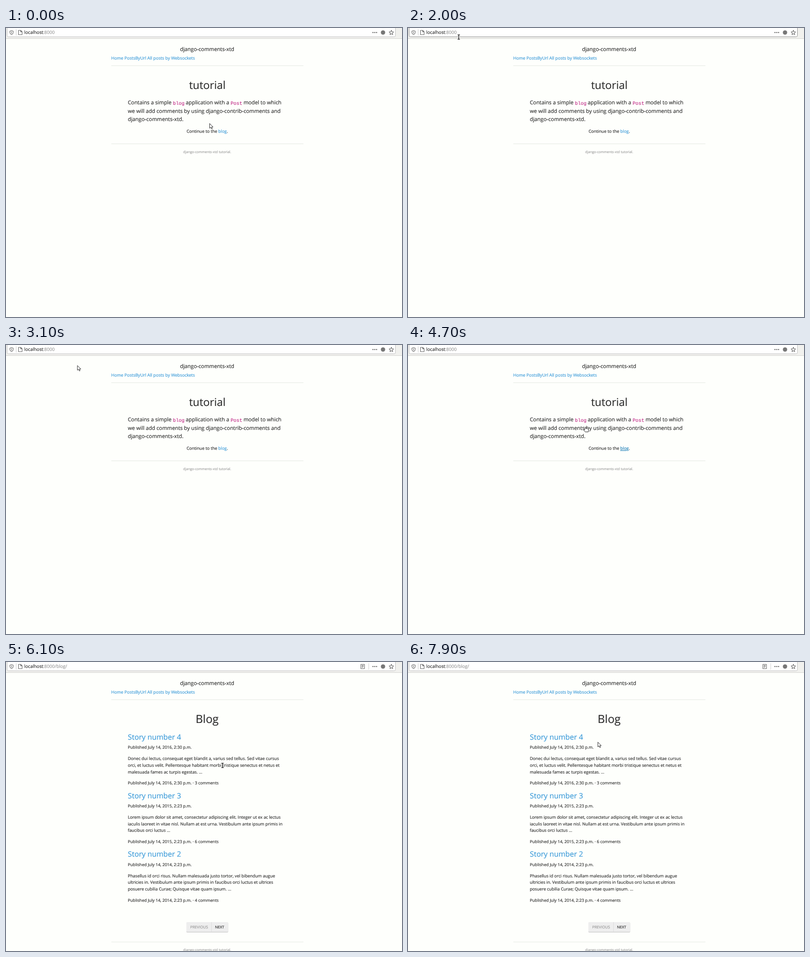
Animation, 876 px wide and 640 px high, one loop 8 s. Source, as an HTML page:

```html
<!DOCTYPE html>
<html lang="en">
<head>
<meta charset="utf-8">
<title>Blog tutorial</title>
<style>
  html, body { margin: 0; width: 876px; height: 640px; overflow: hidden; background: #fefffc; }
  svg { display: block; }
  text { font: 9.35px "Open Sans", "Noto Sans", sans-serif; color: #2d2d2d; text-rendering: geometricPrecision; white-space: pre; }
  text, tspan { fill: currentColor; stroke: currentColor; stroke-width: .18; }
  .mid { text-anchor: middle; }
  .lead { font-size: 11.69px; }
  .code { font: 10.7px "Liberation Mono", monospace; color: #c2308a; }
  .link { color: #3a9ad9; }
  .hover { color: #157ab5; text-decoration: underline; }
  .foot { font-size: 7.47px; color: #a0a0a0; }
  .date { font-size: 9.1px; }
  .story { font-size: 16.25px; }
  .btn { font-size: 8.4px; }
  .rule { stroke: #e3e8e1; }
  .icon { fill: none; stroke: #606060; stroke-width: 1.1; stroke-linejoin: round; }
  .cursor { fill: #fff; stroke: #222; stroke-linejoin: round; }
</style>
</head>
<body>
<svg width="876" height="640" viewBox="0 0 876 640">
  <rect width="876" height="23" fill="#f1f1ee"/>
  <path d="M0 23.5H876" stroke="#d2d2cf"/>
  <rect id="field" x="2.5" y="-4.5" width="859" height="24" rx="3" fill="#fff"/>
  <g class="icon">
    <path d="M12.3 5.7L16 6.9V9.5Q15.8 13 12.3 14.6Q8.8 13 8.6 9.5V6.9ZM12.3 8V12"/>
    <path d="M22.5 3V17" stroke="#d0d0d0"/>
    <path d="M27.6 5.2H32.6L35.6 8.2V14.8H27.6ZM32.4 5.4V8.4H35.4"/>
    <path d="M852.5 5L854 8.3L857.5 8.7L854.9 11.1L855.6 14.6L852.5 12.8L849.4 14.6L850.1 11.1L847.5 8.7L851 8.3Z"/>
  </g>
  <g fill="#606060">
    <circle cx="811.8" cy="10" r="1.3"/><circle cx="815.8" cy="10" r="1.3"/><circle cx="819.8" cy="10" r="1.3"/>
    <circle cx="834" cy="10" r="4.8" fill="#777"/>
  </g>
  <text x="40.3" y="13.4" style="font-size:10px">localhost<tspan id="path" color="#999"></tspan></text>

  <text class="lead mid" x="445" y="50.8">django-comments-xtd</text>
  <text class="link" x="232.7" y="69.9" style="font-size:9.5px"><tspan id="homeLink">Home</tspan> PostsByUrl All posts by Websockets</text>
  <path class="rule" d="M233 83.5H658"/>

  <g id="home">
    <text class="mid" x="445.3" y="134.6" style="font-size:23.8px">tutorial</text>
    <text class="lead" x="269.5" y="169.3">Contains a simple</text>
    <text class="code" x="369.3" y="170">blog</text>
    <text class="lead" x="397.6" y="169.3">application with a</text>
    <text class="code" x="496.9" y="170">Post</text>
    <text class="lead" x="525.4" y="169.3">model to which</text>
    <text class="lead" x="269.5" y="187.7">we will add comments by using django-contrib-comments and</text>
    <text class="lead" x="269.5" y="206">django-comments-xtd.</text>
    <text class="mid" x="445.2" y="232.3">Continue to the <tspan id="blogLink" class="link">blog</tspan>.</text>
    <path class="rule" d="M233 256.5H658"/>
    <text class="foot mid" x="445" y="276.7">django-comments-xtd tutorial.</text>
  </g>

  <g id="blog">
    <path class="icon" d="M785 5.2H793V14.8H785ZM787 7.6H791M787 9.7H791M787 11.8H790"/>
    <path d="M802.5 3V17" stroke="#d0d0d0"/>
    <text class="mid" x="445" y="134.6" style="font-size:24.8px">Blog</text>
    <g id="posts"></g>
    <rect x="399" y="577" width="92.5" height="22" rx="2" fill="#cfcfcf"/>
    <rect x="399" y="576" width="92.5" height="21.5" rx="2" fill="#eee"/>
    <path d="M454.5 576V597.5" stroke="#dcdcdc"/>
    <text class="btn" x="407.4" y="589.8" style="color:#999">PREVIOUS</text>
    <text class="btn" x="462.2" y="589.8">NEXT</text>
    <path class="rule" d="M233 620H658"/>
    <text class="foot mid" x="445" y="639.6">django-comments-xtd tutorial.</text>
  </g>

  <g id="cursor" class="cursor">
    <path id="arrow" d="M.5 .5V11L3 8.8L4.8 12.6L6.5 11.8L4.8 8.2H8Z"/>
    <path id="hand" d="M-1.5 5.4V1.3Q-.5 -.2 .6 1.3V3.8L5.2 4.5Q6.5 5 6.4 6.5L5.8 11.5H-1L-4 7.7Q-3.8 6.2 -2.4 6.9Z"/>
    <g id="beam" fill="none">
      <path d="M-2.5 -4.7H2.5M0 -4.7V4.7M-2.5 4.7H2.5" stroke="#fff" stroke-width="3"/>
      <path d="M-2.5 -4.7H2.5M0 -4.7V4.7M-2.5 4.7H2.5" stroke-width="1.5"/>
    </g>
  </g>
</svg>
<script>
const LOOP = 8000, STEP = 100;
const el = id => document.getElementById(id);

const posts = [
  [4, '2016, 2:30', 3, [
    'Donec dui lectus, consequat eget blandit a, varius sed tellus. Sed vitae cursus',
    'orci, et luctus velit. Pellentesque habitant morbi tristique senectus et netus et',
    'malesuada fames ac turpis egestas. ...']],
  [3, '2015, 2:23', 6, [
    'Lorem ipsum dolor sit amet, consectetur adipiscing elit. Integer ut ex ac lectus',
    'iaculis laoreet in vitae nisl. Nullam at est urna. Vestibulum ante ipsum primis in',
    'faucibus orci luctus ...']],
  [2, '2014, 2:23', 4, [
    'Phasellus id orci risus. Nullam malesuada justo tortor, vel bibendum augue',
    'ultricies in. Vestibulum ante ipsum primis in faucibus orci luctus et ultrices',
    'posuere cubilia Curae; Quisque vitae quam ipsum. ...']]
];
const line = (y, kind, words) => `<text class="${kind}" x="269.5" y="${y}">${words}</text>`;
el('posts').innerHTML = posts.map(([number, when, comments, body], i) => {
  const date = `Published July 14, ${when} p.m.`;
  return `<g transform="translate(0 ${i * 129.7})">` +
    line(172, 'story link', `Story number ${number}`) +
    line(192.3, 'date', date) +
    body.map((words, row) => line(217.2 + row * 14.75, '', words)).join('') +
    line(271.4, 'date', `${date} · ${comments} comments`) + '</g>';
}).join('');

// Pointer moves: first step, last step, x, y, shape
const moves = [
  [0, 0, 450, 211, 'arrow'],
  [100, 400, 267, 133, 'arrow'],
  [600, 800, 245, 80, 'arrow'],
  [900, 900, 239, 67, 'hand'],
  [1100, 1100, 241, 68, 'hand'],
  [1400, 1600, 238, 73, 'arrow'],
  [1800, 1800, 227, 69, 'arrow'],
  [2000, 2000, 112.3, 20, 'beam'],
  [2100, 2400, 82, 8, 'beam'],
  [2700, 2900, 120, 25, 'beam'],
  [3100, 3100, 157.5, 45, 'arrow'],
  [3200, 3400, 225, 60, 'arrow'],
  [3500, 3500, 243, 65, 'hand'],
  [4000, 4000, 244, 66, 'hand'],
  [4300, 4500, 340, 150, 'arrow'],
  [4600, 4700, 393, 181, 'hand'],
  [4900, 5000, 478, 240, 'hand'],
  [5100, 5100, 485, 242, 'hand'],
  [5200, 5200, 479, 229, 'hand'],
  [6000, 6000, 479, 229, 'beam'],
  [6500, 6500, 479.5, 230, 'beam'],
  [6700, 6900, 479, 228, 'beam'],
  [7200, 7300, 465, 217, 'beam'],
  [7400, 7900, 419.5, 177, 'arrow']
];
const between = (t, from, to) => t >= from && t < to;
const show = (id, on) => el(id).style.display = on ? '' : 'none';

function pointerAt(t) {
  const i = moves.findLastIndex(move => move[0] <= t);
  const [start, end, x, y, shape] = moves[i];
  const [, , x0, y0] = moves[Math.max(0, i - 1)];
  const k = Math.min(1, (t - start + STEP) / (end - start + STEP));
  return { x: x0 + (x - x0) * k, y: y0 + (y - y0) * k, shape };
}

function draw(now) {
  const t = Math.floor(now % LOOP / STEP) * STEP;
  const { x, y, shape } = pointerAt(t);
  const onBlog = t >= 6100;
  el('cursor').setAttribute('transform', `translate(${x} ${y})`);
  for (const id of ['arrow', 'hand', 'beam']) show(id, id === shape);
  show('home', !onBlog);
  show('blog', onBlog);
  el('path').textContent = onBlog ? ':8000/blog/' : ':8000';
  el('homeLink').classList.toggle('hover', between(t, 900, 1400) || between(t, 3500, 4300));
  el('blogLink').classList.toggle('hover', t >= 4700);
  el('field').setAttribute('stroke', between(t, 2000, 3100) ? '#8c8c8c' : '#bebebe');
}

function tick() {
  draw(performance.now());
  requestAnimationFrame(tick);
}
tick();
</script>
</body>
</html>
```
